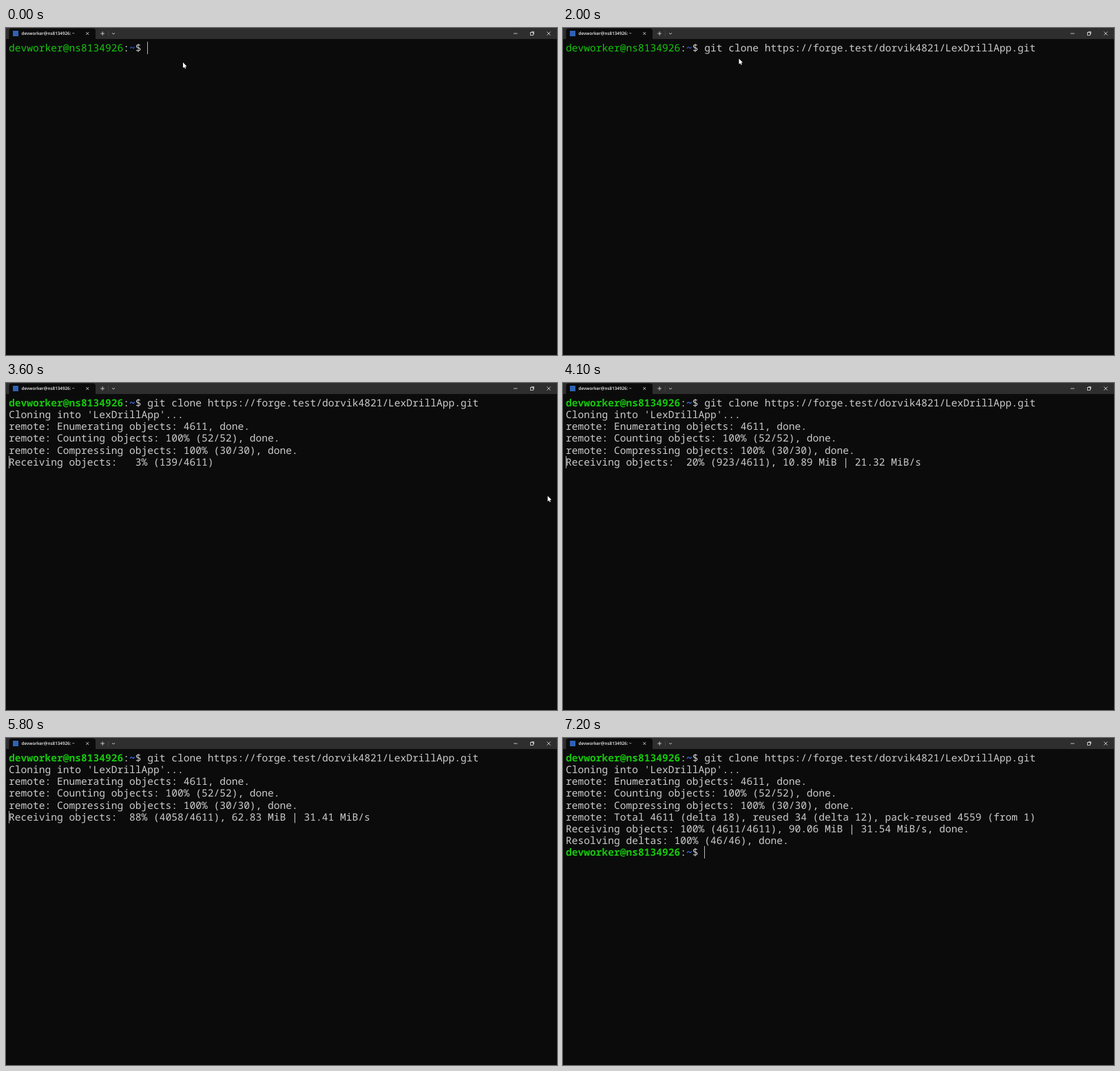
An HTML page with a canvas that plays this animation: 800 px wide and 475 px high, repeating every 8 s.

```html
<!DOCTYPE html>
<html lang="en">
<head>
<meta charset="utf-8">
<title>Terminal</title>
<style>
  html, body { margin: 0; width: 100%; height: 100%; overflow: hidden; background: #0b0b0c; }
  canvas { display: block; width: 800px; height: 475px; }
</style>
</head>
<body>
<canvas id="stage"></canvas>
<script>
const W = 800, H = 475, LOOP = 8000;
const canvas = document.getElementById('stage');
const ctx = canvas.getContext('2d');
const dpr = window.devicePixelRatio || 1;
canvas.width = W * dpr;
canvas.height = H * dpr;

const CELL = 8.75, ROW = 17.125, LEFT = 4, BASE = 34;
const MONO = '"Noto Sans Mono", "DejaVu Sans Mono", monospace';
const UI = '"Open Sans", "Noto Sans", sans-serif';
const BG = '#0b0b0c', BAR = '#2e2e2e', FG = '#cccccc', GREEN = '#16c60c', BLUE = '#3b78ff';

const USER = 'devworker@ns8134926';
const REPO = 'LexDrillApp';
const COMMAND = `git clone https://forge.test/dorvik4821/${REPO}.git`;
const PROMPT_COLS = USER.length + 4;
const TOTAL = 4611;

// [start ms, value]; the last entry already started applies
const at = (steps, t) => steps.filter(s => s[0] <= t).pop();

const PROGRESS = [
  [3500, 1], [3600, 3], [3700, 7], [3800, 11], [3900, 14],
  [4100, 20, '10.89', '21.32'], [4300, 31, '10.89', '21.32'],
  [4500, 42, '10.89', '21.32'], [4700, 52, '28.76', '28.75'],
  [4900, 57, '28.76', '28.75'], [5000, 60, '45.47', '30.29'],
  [5300, 72, '45.47', '30.29'], [5800, 88, '62.83', '31.41']
];

// [start ms, x, y]; no position means hidden
const MOUSE = [
  [0, 257, 50], [100, 257, 49], [200, 256.5, 48], [300, 256.5, 47],
  [700, 256, 46], [800, 256, 45], [1200, 255.5, 44.5], [2500],
  [3100, 573, 126], [3300, 690, 150], [3400, 786, 168], [3500, 786.5, 164],
  [3700]
];

// [start ms, column, row]
const CARET = [
  [0, PROMPT_COLS, 0], [300], [1200, PROMPT_COLS, 0], [1400],
  [1800, PROMPT_COLS + COMMAND.length, 0], [2000], [2500, 0, 2],
  [3300, 0, 3], [3400, 0, 5], [6300, 0, 8], [7000, PROMPT_COLS, 8]
];

const OUTPUT = [
  [2500, 1, `Cloning into '${REPO}'...`],
  [3300, 2, `remote: Enumerating objects: ${TOTAL}, done.`],
  [3400, 3, 'remote: Counting objects: 100% (52/52), done.'],
  [3400, 4, 'remote: Compressing objects: 100% (30/30), done.'],
  [6300, 5, `remote: Total ${TOTAL} (delta 18), reused 34 (delta 12), pack-reused 4559 (from 1)`],
  [6300, 6, `Receiving objects: 100% (${TOTAL}/${TOTAL}), 90.06 MiB | 31.54 MiB/s, done.`],
  [6300, 7, 'Resolving deltas: 100% (46/46), done.']
];

function text(str, col, row, color = FG, weight = 500) {
  ctx.font = `${weight} ${CELL / 0.6}px ${MONO}`;
  ctx.fillStyle = color;
  ctx.fillText(str, LEFT + col * CELL, BASE + row * ROW);
}

function prompt(row, weight) {
  const n = USER.length;
  text(USER, 0, row, GREEN, weight);
  text(':', n, row);
  text('~', n + 1, row, BLUE, weight);
  text('$', n + 2, row);
}

function line(...pts) {
  ctx.beginPath();
  for (let i = 0; i < pts.length; i += 2) ctx.lineTo(pts[i], pts[i + 1]);
  ctx.stroke();
}

function cross(x, y, r) {
  line(x - r, y - r, x + r, y + r);
  line(x - r, y + r, x + r, y - r);
}

function titleBar() {
  ctx.fillStyle = BAR;
  ctx.fillRect(0, 0, W, 16);
  ctx.fillStyle = BG;
  ctx.beginPath();
  ctx.roundRect(4.5, 0.5, 125.5, 16, [4, 4, 0, 0]);
  ctx.fill();
  ctx.fillStyle = '#2f62b5';
  ctx.fillRect(10, 4, 8, 8);

  ctx.font = `600 6.3px ${UI}`;
  ctx.fillStyle = '#f2f2f2';
  ctx.fillText(USER + ': ~', 22.5, 10.3);

  ctx.strokeStyle = '#e4e4e4';
  ctx.lineWidth = 0.8;
  cross(118.3, 8, 2);
  line(137.3, 8, 143, 8);
  line(140.2, 5.1, 140.2, 10.9);
  line(154, 7.2, 156, 9, 158, 7.2);
  line(737, 8, 742.5, 8);
  ctx.strokeRect(761.4, 6.4, 4, 4);
  line(762.8, 5.4, 766.4, 5.4, 766.4, 9);
  cross(788, 8, 2.6);
  ctx.strokeStyle = '#454545';
  line(148.5, 4, 148.5, 12);
}

function progressLine(t) {
  const p = at(PROGRESS, t);
  if (!p || t >= 6300) return;
  const [, pct, size, rate] = p;
  const count = Math.ceil(pct * TOTAL / 100);
  const speed = size ? `, ${size} MiB | ${rate} MiB/s` : '';
  text(`Receiving objects: ${String(pct).padStart(3)}% (${count}/${TOTAL})${speed}`, 0, 5);
}

function caret(t) {
  const [, col, row] = at(CARET, t);
  if (col === undefined) return;
  ctx.fillStyle = '#b4b4b4';
  ctx.fillRect(Math.floor(LEFT + col * CELL), Math.round(20 + row * ROW), 1, 18);
}

function mouse(t) {
  const [, x, y] = at(MOUSE, t);
  if (x === undefined) return;
  ctx.save();
  ctx.translate(x, y);
  ctx.beginPath();
  ctx.moveTo(0, 0);
  ctx.lineTo(0, 8);
  ctx.lineTo(1.8, 6.4);
  ctx.lineTo(3, 9);
  ctx.lineTo(4.3, 8.4);
  ctx.lineTo(3.1, 5.9);
  ctx.lineTo(5.5, 5.7);
  ctx.closePath();
  ctx.fillStyle = '#fff';
  ctx.fill();
  ctx.restore();
}

function draw(t) {
  ctx.setTransform(dpr, 0, 0, dpr, 0, 0);
  ctx.textRendering = 'geometricPrecision';
  ctx.fillStyle = BG;
  ctx.fillRect(0, 0, W, H);
  titleBar();
  prompt(0, t < 2500 ? 500 : 700);
  if (t >= 1800) text(COMMAND, PROMPT_COLS, 0);
  for (const [start, row, str] of OUTPUT) if (t >= start) text(str, 0, row);
  progressLine(t);
  if (t >= 7000) prompt(8, 700);
  caret(t);
  mouse(t);
}

const begin = performance.now();
function tick() {
  draw((performance.now() - begin) % LOOP);
  requestAnimationFrame(tick);
}
tick();
</script>
</body>
</html>
```
